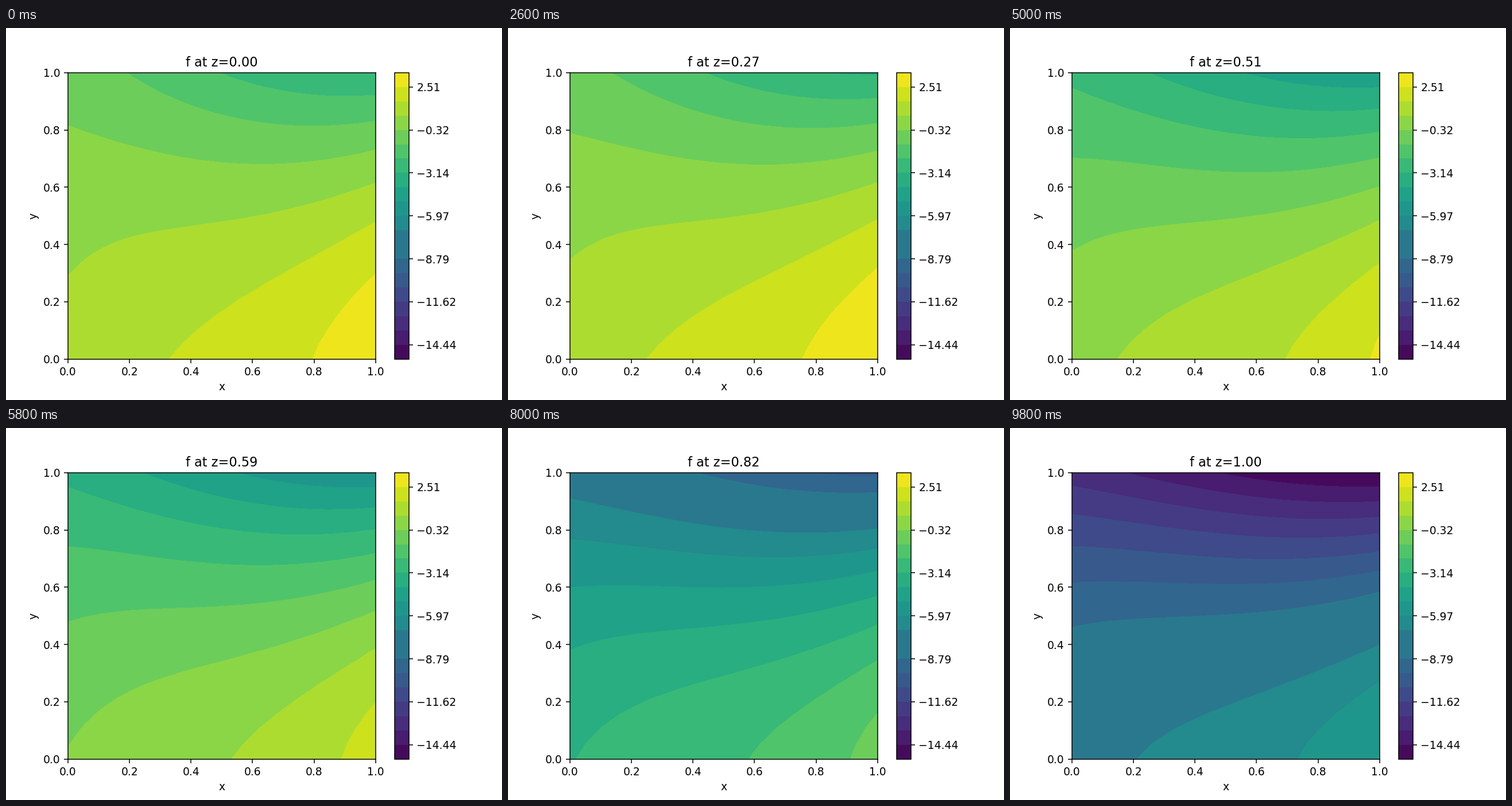
These frames come from a looping animation (864 by 648 pixels, 10000 ms). A matplotlib script:

```python
import numpy as np
import matplotlib.pyplot as plt
from matplotlib.animation import FuncAnimation
from matplotlib.colors import BoundaryNorm, ListedColormap

FRAMES = 50
BANDS = 20
LOW, HIGH = -15.384, 3.452

levels = np.linspace(LOW, HIGH, BANDS + 1)
colors = plt.get_cmap("viridis")((np.arange(BANDS) + 0.5) / BANDS)
# two neighbouring bands share one tone
colors[7:9] = plt.get_cmap("viridis")(0.4)
cmap = ListedColormap(colors)
norm = BoundaryNorm(levels, BANDS)

axis = np.linspace(0, 1, 20)
X, Y = np.meshgrid(axis, axis)
Z = np.linspace(0, 1, FRAMES)


def field(x, y, z):
    along_x = 2.26 * x - 2.41 * x**2 + 2.46 * x**3
    along_y = -1.1 * y - 0.63 * y**2
    along_z = z + 0.5 * z**2 - 9.8 * z**3
    return 1 + along_x + along_y + along_z - 4.66 * x * y**2 - 4 * y**2 * z**2


def tick_text(value):
    return f"{value:.2f}".replace("-", "\u2212")


fig, ax = plt.subplots(figsize=(6.4, 4.8), dpi=135)
ticks = levels[1::3]
bar = fig.colorbar(plt.cm.ScalarMappable(norm, cmap), ax=ax, ticks=ticks)
bar.ax.set_yticks(ticks, [tick_text(t) for t in ticks])
bar.minorticks_off()


def draw(i):
    ax.clear()
    ax.contourf(X, Y, field(X, Y, Z[i]), levels=levels, colors=colors)
    ax.set_xlim(0, 1)
    ax.set_ylim(0, 1)
    ax.set_xlabel("x")
    ax.set_ylabel("y")
    ax.set_title(f"f at z={Z[i]:.2f}")
    return []


anim = FuncAnimation(fig, draw, frames=FRAMES, init_func=lambda: draw(0),
                     interval=200, repeat=True, repeat_delay=0)
plt.show()
```
